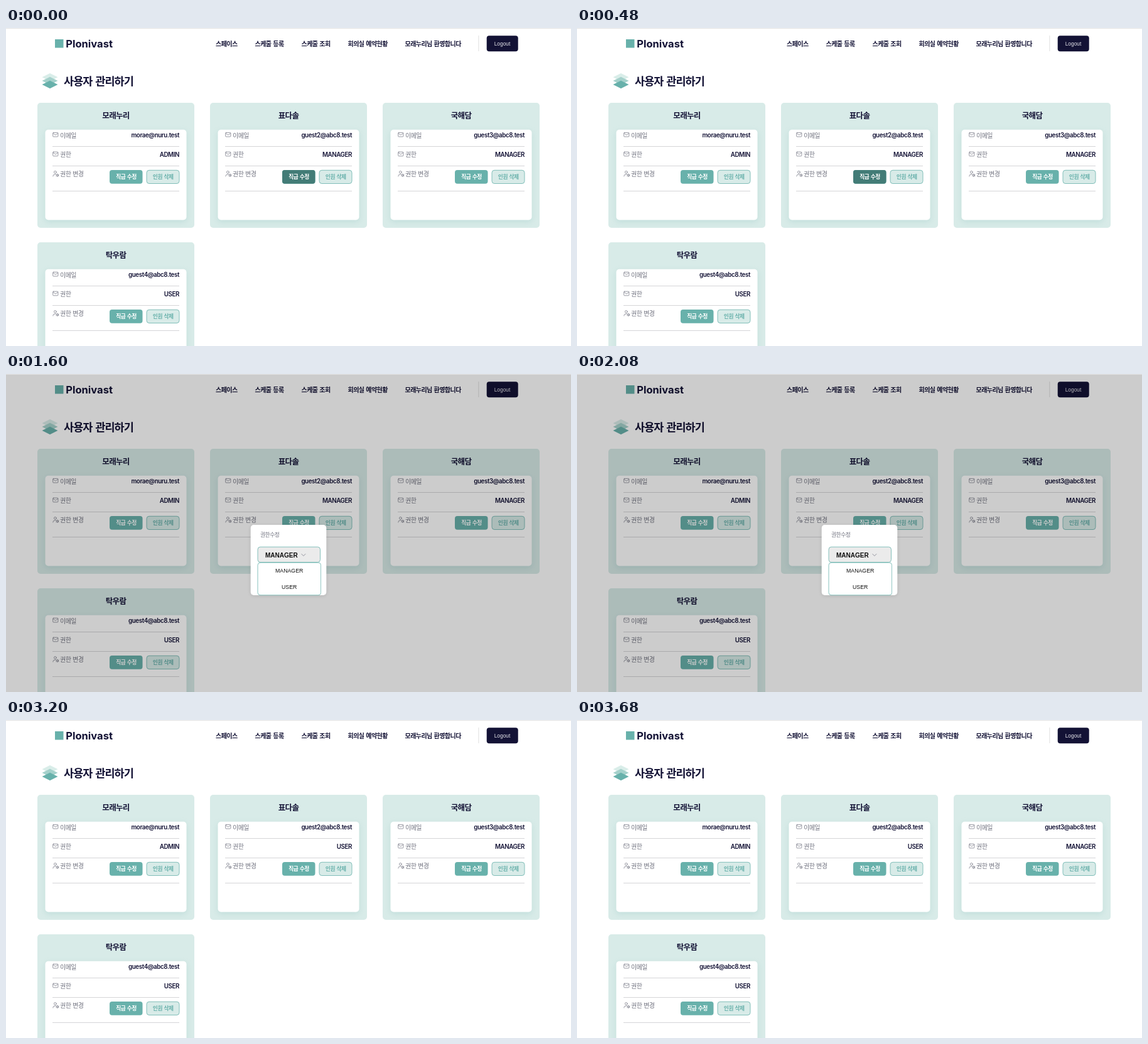
Animation of 900x506 px, one loop 4 s. Source, as an HTML page:

```html
<!DOCTYPE html>
<html lang="ko">
<head>
<meta charset="utf-8">
<title>사용자 관리하기</title>
<style>
  :root { --teal: #68b1ab; --mint: #d8ebe8; --navy: #131235; }
  html, body { margin: 0; width: 100%; height: 100%; overflow: hidden; background: #fff; }
  svg { display: block; width: 900px; height: 506px; }
  text { fill: var(--navy); }
  .ko {
    font-family: "Noto Sans CJK KR", "Noto Sans CJK", "Noto Sans", sans-serif;
    letter-spacing: -.055em; word-spacing: .055em;
  }
  .en { font: 600 9.75px Inter, sans-serif; letter-spacing: -.04em; }
  .ar { font-family: "Liberation Sans", Arial, sans-serif; }
  .brand { font: 700 16.5px Inter, sans-serif; }
  .s17 { font-size: 17.5px; }
  .s12 { font-size: 12.5px; }
  .s10 { font-size: 10px; }
  .s8 { font-size: 8.75px; }
  .w5 { font-weight: 500; }
  .w6 { font-weight: 600; }
  .mid { text-anchor: middle; }
  .end { text-anchor: end; }
  .gray { fill: #70727f; }
  .white { fill: #fff; }
  .teal { fill: var(--teal); }
  .pale { fill: #8fc6c0; }
  .black { fill: #111; }
  .icon { fill: none; stroke: #777986; stroke-width: .75; stroke-linejoin: round; stroke-linecap: round; }
  .inner { filter: drop-shadow(0 3px 5px rgba(104, 177, 171, .2)); }
  .modal { filter: drop-shadow(0 1px 3px rgba(0, 0, 0, .12)); }
</style>
</head>
<body>
<svg id="stage" viewBox="0 0 900 506"></svg>
<script>
const STEP = 800, STEPS = 5, LOOP = STEP * STEPS;
const TEAL = 'var(--teal)', MINT = 'var(--mint)', NAVY = 'var(--navy)';

const text = (x, y, cls, str) => `<text x="${x}" y="${y}" class="${cls}">${str}</text>`;
const rect = (x, y, w, h, r, fill, more = '') =>
  `<rect x="${x}" y="${y}" width="${w}" height="${h}" rx="${r}" fill="${fill}" ${more}/>`;
const outlined = (x, y, w, h, fill) => rect(x, y, w, h, 4, fill, `stroke="${TEAL}" stroke-width=".8"`);
// Each digit tells whether the group is visible during that step.
const when = (pattern, body) => `<g data-on="${pattern}">${body}</g>`;

const mail = y =>
  `<g class="icon"><rect x="24.7" y="${y}" width="8.2" height="6.6" rx="1"/>
   <path d="M25 ${y + 1.3}l3.8 2.5 3.8-2.5"/></g>`;
const userCog =
  `<g class="icon"><circle cx="28.4" cy="110.4" r="1.9"/><path d="M24.9 117v-.5q0-2.6 3.4-2.6h1"/>
   <circle cx="31.9" cy="115.3" r="1.4"/>
   <path d="M31.9 113v.8M31.9 116.8v.8M29.8 114.1l.7.4M33.3 116.1l.7.4M29.8 116.5l.7-.4M33.3 114.5l.7-.4"/></g>`;

function card(x, y, name, email, role, hover = '') {
  const lines = [69.5, 100.5, 140.5].map(d => rect(24, d - .4, 202, .8, 0, '#cbcbcf')).join('');
  return `<g transform="translate(${x} ${y})">
    ${rect(0, 0, 250, 199, 5, MINT)}
    ${text(125, 25.4, 'ko s12 w6 mid', name)}
    ${rect(12.5, 42.7, 225, 143.8, 5, '#fff', 'class="inner"')}
    ${lines}
    ${mail(47.4)}${mail(78.2)}${userCog}
    ${text(36, 55.5, 'ko s10 w5 gray', '이메일')}
    ${text(36, 86.3, 'ko s10 w5 gray', '권한')}
    ${text(36, 117, 'ko s10 w5 gray', '권한 변경')}
    ${text(226, 55.2, 'en end', email)}
    ${role}
    ${rect(115, 107, 52.5, 21.8, 4, TEAL)}${hover}
    ${text(141.5, 121, 'ko s8 w6 mid white', '직급 수정')}
    ${outlined(174, 107.3, 52, 21.2, MINT)}
    ${text(200.2, 121, 'ko s8 w6 mid teal', '인원 삭제')}
  </g>`;
}
const role = str => text(226, 86, 'en end', str);

const layer = (y, fill) => `<path d="M57.5 ${y}L70 ${y - 6.3}L82.5 ${y}L70 ${y + 6.3}Z" fill="${fill}"/>`;

const nav = [[334, '스페이스'], [396.5, '스케줄 등록'], [470.5, '스케줄 조회'],
  [544.5, '회의실 예약현황'], [635.5, '모래누리님 환영합니다']];

const header =
  rect(78, 18, 13.5, 13.5, 0, TEAL) + text(95.3, 31, 'brand', 'Plonivast') +
  nav.map(([x, s]) => text(x, 28.7, 'ko s10 w6', s)).join('') +
  rect(752.5, 12, .8, 25, 0, '#d6d6d6') +
  rect(765.7, 12.2, 50, 25, 4, NAVY) +
  `<text x="790.5" y="28" class="ar mid" style="font-size:8.4px;fill:#e4e4ea">Logout</text>`;

const heading =
  layer(78.3, '#d9ede9') + layer(84, '#a5d1cb') + layer(90, TEAL) +
  text(92, 91, 'ko s17 w6', '사용자 관리하기');

const cards =
  card(50, 119, '모래누리', 'morae@nuru.test', role('ADMIN')) +
  card(325, 119, '표다솔', 'guest2@abc8.test',
    when('11110', role('MANAGER')) + when('00001', role('USER')),
    when('10000', rect(115, 107, 52.5, 21.8, 4, '#437c77'))) +
  card(600, 119, '국해담', 'guest3@abc8.test', role('MANAGER')) +
  card(50, 341, '탁우람', 'guest4@abc8.test', role('USER'));

const submit = (fill, cls) =>
  outlined(401.5, 316.4, 49.4, 21.2, fill) + text(426.4, 330, `ko w5 mid ${cls}" font-size="8.4`, '수정하기');

const modal =
  rect(389.7, 240, 120.6, 112, 5, '#fff', 'class="modal"') +
  text(405, 259.2, 'ko s8 w5 gray', '권한수정') +
  outlined(401, 275.2, 99.5, 24.3, '#ebebeb') +
  when('01100', text(438.8, 292.1, 'ar s10 mid black" font-weight="700', 'MANAGER')) +
  when('00010', text(438.8, 292.1, 'ar s10 mid black" font-weight="700', 'USER')) +
  '<path d="M470.8 286.4l3.1 3.1 3.1-3.1" class="icon"/>' +
  when('01000', submit(MINT, 'pale')) +
  when('00010', submit('#fff', 'teal')) +
  when('01010', rect(452.5, 316, 49.5, 22, 4, TEAL) + text(477.4, 330.2, 'ko s8 w6 mid white', '닫기')) +
  when('00100',
    outlined(401, 300.2, 100.6, 51.6, '#fff') +
    text(451.2, 316.1, 'ar s8 mid black', 'MANAGER') +
    text(451.2, 341.7, 'ar s8 mid black', 'USER'));

const stage = document.getElementById('stage');
stage.innerHTML = header + heading + cards +
  when('01110', rect(0, 1, 900, 505, 0, '#000', 'fill-opacity=".2"') + modal) +
  rect(0, 0, 900, 1, 0, '#e2e2e2');

for (const el of stage.querySelectorAll('[data-on]')) {
  const states = [...el.dataset.on];
  const frames = [...states, states[STEPS - 1]].map((on, i) =>
    ({ opacity: +on, offset: i / STEPS, easing: 'step-end' }));
  el.animate(frames, { duration: LOOP, iterations: Infinity }).startTime = 0;
}
</script>
</body>
</html>
```
